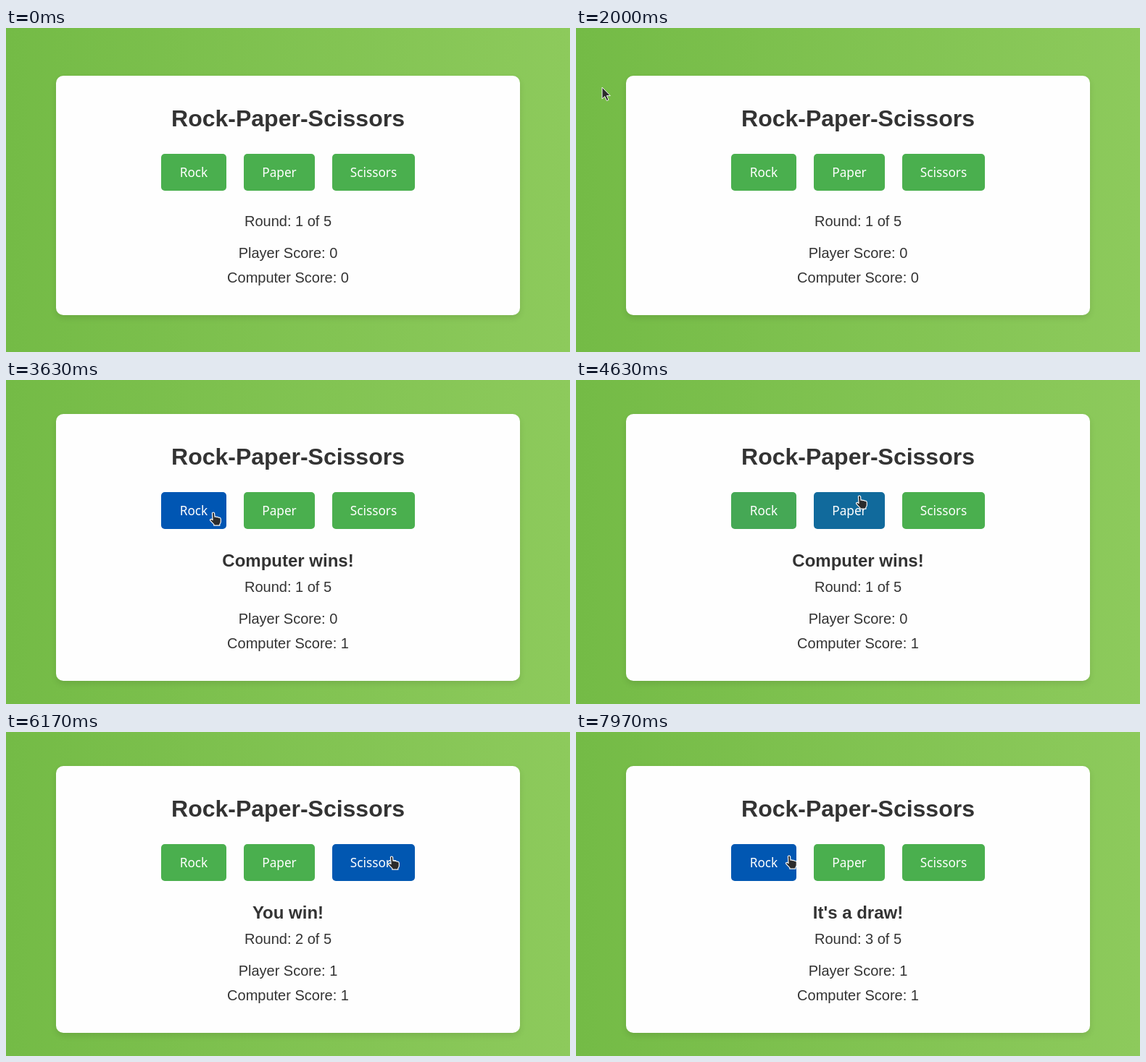
Animation of 778x448 px, one loop 8000 ms. Source, as an HTML page:

```html
<!DOCTYPE html>
<html lang="en">
<head>
<meta charset="utf-8">
<title>Rock-Paper-Scissors</title>
<style>
  html, body { margin: 0; width: 100%; height: 100%; overflow: hidden; }
  body {
    position: relative;
    background: linear-gradient(to right, #74bb46, #8dca5c);
    color: #333;
    font: 20px/23px "Liberation Sans", Arial, sans-serif;
    text-align: center;
  }
  #card {
    position: absolute; left: 69px; width: 640px;
    background: #fefefe; border-radius: 10px;
    box-shadow: 0 4px 8px rgba(0, 0, 0, .1);
  }
  #card > * { position: absolute; margin: 0; }
  h1, h2, #status { left: 0; width: 100%; }
  h1 { top: 41px; font-size: 32px; line-height: 37px; }
  h2 { top: 189px; font-size: 24px; line-height: 28px; }
  #status div { position: absolute; width: 100%; }
  .choice {
    top: 108px; height: 51px; border-radius: 5px; color: #fff;
    font: 17.2px/51px "Noto Sans", "Open Sans", sans-serif;
  }
  #pointer { position: absolute; left: 0; top: 0; overflow: visible; }
  #pointer path { stroke-linejoin: round; }
</style>
</head>
<body>
<div id="card">
  <h1>Rock-Paper-Scissors</h1>
  <div class="choice">Rock</div>
  <div class="choice">Paper</div>
  <div class="choice">Scissors</div>
  <h2 id="result"></h2>
  <div id="status">
    <div id="round" style="top:0"></div>
    <div id="player" style="top:44px"></div>
    <div id="computer" style="top:78px"></div>
  </div>
</div>
<svg id="pointer" width="20" height="22">
  <path id="arrow" d="M0 0V16L3.7 12.6L6.4 18.6L9 17.4L6.4 11.6H11.3Z"
        fill="#2b2b2b" stroke="#f4f4f4" stroke-width="1"/>
  <path id="hand" d="M-1.6 .8Q0 -.8 1.5 .8L2 6.2Q3.4 5.2 4.7 6.6Q6 5.8 7.2 7.2Q10 6.6 10.3 9.4V13.2Q10 15.4 8.8 16.4V18.2H.8V16.6Q-1.6 14.4 -4.4 11.2Q-4.8 9.2 -2.7 9.3L-1 10.6Z"
        fill="#2b2b2b" stroke="#f8f8f8" stroke-width="1.2"/>
</svg>
<script>
const LOOP = 8000, FADE = 300;
const GREEN = [74, 175, 78], BLUE = [0, 86, 179];

// time, result, round, player score, computer score
const states = [
  [0, "", 1, 0, 0],
  [3400, "Computer wins!", 1, 0, 1],
  [5170, "You win!", 2, 1, 1],
  [6700, "It's a draw!", 3, 1, 1]
];

// time, x, y of the pointer tip
const path = [
  [1600, -16, 72], [2000, 36, 82], [2500, 52, 90], [3200, 284, 190],
  [3450, 286, 183], [4330, 286, 183], [4750, 416, 155], [5000, 411, 171],
  [5720, 411, 171], [6250, 540, 172], [6500, 545, 167], [7270, 545, 167],
  [7760, 296, 172], [7900, 294, 171]
];

const $ = id => document.getElementById(id);
const buttons = [...document.querySelectorAll(".choice")].map((el, i) => {
  const left = [145, 259, 381][i], width = [90, 98, 114][i];
  el.style.left = left + "px";
  el.style.width = width + "px";
  return { el, x: 69 + left, width, hovers: [] };
});

const clamp = v => Math.min(1, Math.max(0, v));
const smooth = u => u * u * (3 - 2 * u);
const stateAt = t => states.findLast(s => t >= s[0]);
const cardTop = state => state[1] ? 47 : 66;

// CSS "ease": cubic-bezier(.25, .1, .25, 1)
function ease(x) {
  x = clamp(x);
  let lo = 0, hi = 1, s = x;
  for (let i = 0; i < 16; i++) {
    s = (lo + hi) / 2;
    const bx = .75 * s * (1 - s) ** 2 + .75 * s * s * (1 - s) + s ** 3;
    if (bx < x) lo = s; else hi = s;
  }
  return .3 * s * (1 - s) ** 2 + 3 * s * s * (1 - s) + s ** 3;
}

function pointerAt(t) {
  const i = path.findIndex(p => p[0] > t);
  if (i === 0) return path[0].slice(1);
  if (i < 0) return path.at(-1).slice(1);
  const [t0, x0, y0] = path[i - 1], [t1, x1, y1] = path[i];
  const u = smooth((t - t0) / (t1 - t0));
  return [x0 + (x1 - x0) * u, y0 + (y1 - y0) * u];
}

function isOver(button, t) {
  const [x, y] = pointerAt(t), top = cardTop(stateAt(t)) + 108;
  return x >= button.x && x < button.x + button.width && y >= top && y < top + 51;
}

// Hover intervals follow from the pointer path
for (const b of buttons) {
  let start = null;
  for (let t = 0; t <= LOOP; t += 10) {
    const over = isOver(b, t);
    if (over && start === null) start = t;
    if (!over && start !== null) { b.hovers.push([start, t]); start = null; }
  }
  if (start !== null) b.hovers.push([start, LOOP]);
}

// Fades in while hovered, then out from the level reached
const fade = (t, [on, off]) =>
  ease((Math.min(t, off) - on) / FADE) * (1 - ease((t - off) / FADE));

function draw(t) {
  const state = stateAt(t), [, result, round, player, computer] = state;
  $("card").style.top = cardTop(state) + "px";
  $("card").style.height = (result ? 369 : 331) + "px";
  $("status").style.top = (result ? 228 : 190) + "px";
  $("result").textContent = result;
  $("round").textContent = `Round: ${round} of 5`;
  $("player").textContent = `Player Score: ${player}`;
  $("computer").textContent = `Computer Score: ${computer}`;

  for (const b of buttons) {
    const level = Math.max(0, ...b.hovers.map(h => fade(t, h)));
    b.el.style.background = `rgb(${GREEN.map((g, i) => Math.round(g + (BLUE[i] - g) * level))})`;
  }

  const [x, y] = pointerAt(t), over = buttons.some(b => isOver(b, t));
  $("pointer").style.transform = `translate(${Math.round(x)}px, ${Math.round(y)}px)`;
  $("arrow").style.display = over ? "none" : "";
  $("hand").style.display = over ? "" : "none";
}

const begin = performance.now();
function tick() {
  draw((performance.now() - begin) % LOOP);
  requestAnimationFrame(tick);
}
tick();
</script>
</body>
</html>
```
